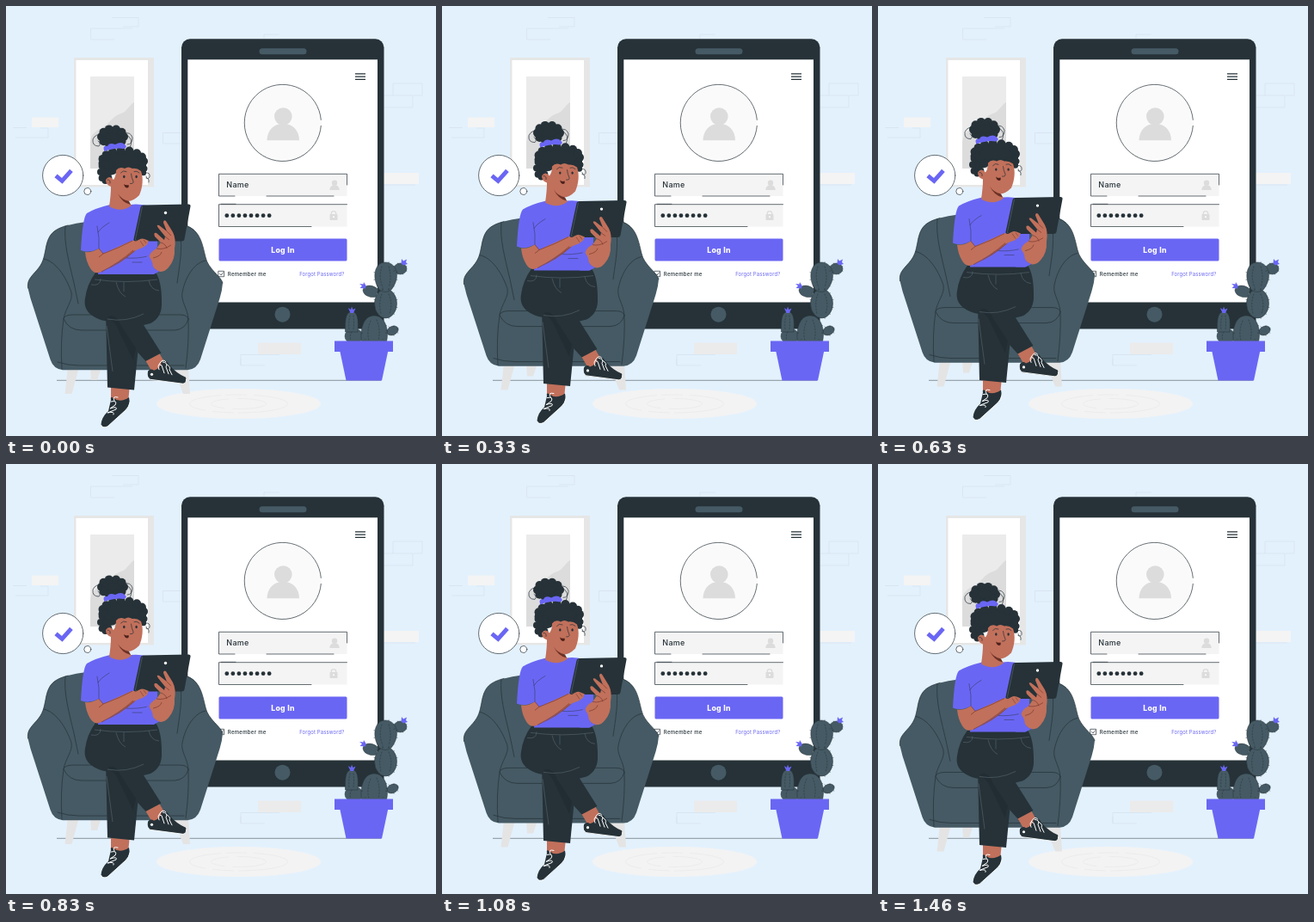
An HTML page for the animation above (1500 ms loop, 500 by 500 pixels).

```html
<!DOCTYPE html>
<html lang="en">
<head>
<meta charset="utf-8">
<title>Log in</title>
<style>
  html, body { margin: 0; width: 100%; height: 100%; overflow: hidden; background: #e3f1fd; }
  svg { display: block; width: 100vw; height: 100vh; }
  text { font-family: Inter, "Open Sans", sans-serif; fill: #263238; }
  .dark { fill: #263238; }
  .slate { fill: #455a64; }
  .accent { fill: #6a66f4; }
  .skin { fill: #c1705b; }
  .grey { fill: #dcdcdc; }
  .pale { fill: #f4f4f4; }
  .line { fill: none; stroke: #263238; stroke-width: .7; stroke-linecap: round; stroke-linejoin: round; }
  .brick { fill: none; stroke: #d6e2ec; stroke-width: .7; }
  .lace { fill: none; stroke: #fff; stroke-width: 1; stroke-linecap: round; }
</style>
</head>
<body>
<svg viewBox="0 0 500 500">
  <rect width="500" height="500" fill="#e3f1fd"/>

  <!-- wall -->
  <g class="brick">
    <path d="M147 26H98.500V39H126M123 13.500H154V24H136M8 141.500H24M11 153H49V142H40M205 147.500H182.500V160H205M300 38V33H318"/>
    <path d="M440 104H450V90H484V104H474M450 104H473V118H440M440 208H476M318 405.500H273V418H301M273 410V418"/>
  </g>
  <rect class="pale" x="30" y="129.500" width="31" height="11.500"/>
  <rect class="pale" x="436" y="194" width="44" height="13"/>
  <rect x="293" y="391.500" width="50" height="13.500" fill="#ebebeb"/>

  <!-- picture -->
  <rect x="79" y="60" width="93" height="150.500" fill="#e6e6e6"/>
  <rect x="81.500" y="63" width="83.500" height="145" fill="#fff"/>
  <rect x="98" y="82" width="51" height="107" fill="#ebebeb"/>
  <path d="M149 112C143 115 142 122 134 125C121 129 119 141 107 144Q99 148 98 158V189H149Z" fill="#dcdcdc"/>

  <!-- rug and floor -->
  <ellipse cx="270.500" cy="462.500" rx="95.500" ry="17.500" fill="#f3f3f3"/>
  <g fill="none" stroke="#e9e9e9" stroke-width=".7">
    <ellipse cx="270.500" cy="462.500" rx="57" ry="10.500" stroke-dasharray="60 5 25 8"/>
    <ellipse cx="270.500" cy="462.500" rx="32" ry="6" stroke-dasharray="40 9"/>
  </g>
  <path d="M59 435.300H436" stroke="#87939a" stroke-width="1"/>

  <!-- device -->
  <rect class="dark" x="204" y="38.300" width="235.500" height="337.300" rx="10"/>
  <rect x="211.300" y="62.300" width="220.700" height="282.200" fill="#fff"/>
  <rect class="slate" x="294.500" y="49.200" width="55" height="7" rx="3.500"/>
  <circle class="slate" cx="321.500" cy="358.700" r="9"/>
  <path d="M406 78.800H418M406 82.100H418M406 85.400H418" stroke="#263238" stroke-width="1.200"/>

  <circle cx="322" cy="137.400" r="44.600" fill="#fafafa"/>
  <path class="line" d="M366.300 132.400A44.600 44.600 0 1 0 366.300 139.400" stroke-width=".6"/>
  <circle class="grey" cx="322.300" cy="128.500" r="10.300"/>
  <path class="grey" d="M303.500 156.200C303.500 145 311 136.700 322.300 136.700S341 145 341 156.200Z"/>

  <g class="pale">
    <rect x="247.500" y="195" width="149" height="26"/>
    <rect x="247.500" y="230.500" width="149" height="26"/>
  </g>
  <path class="line" d="M266 221H247.500V195.300H396.500V208M303 221H381"/>
  <path class="line" d="M355 256.500H247.500V230.700H396.500M250 230.300H267"/>
  <text x="256.300" y="211" font-size="9" font-weight="500" letter-spacing=".3">Name</text>
  <g class="grey">
    <circle cx="382" cy="205.700" r="3.200"/>
    <path d="M376.300 214Q376.500 209.500 380 208.500H384Q387.500 209.500 387.700 214Z"/>
    <rect x="376.500" y="242" width="9" height="7" rx=".8"/>
  </g>
  <path d="M378.300 242.500V241Q378.300 238.700 381 238.700T383.700 241V242.500" fill="none" stroke="#dcdcdc" stroke-width="1.300"/>
  <circle cx="381" cy="245.200" r="1" fill="#fff"/>
  <g id="dots" class="dark"></g>
  <rect class="accent" x="247.500" y="270.500" width="149" height="26" rx="1.500"/>
  <text x="322" y="286.600" font-size="8.700" font-weight="800" letter-spacing=".3" text-anchor="middle" style="fill:#fff">Log In</text>
  <rect class="line" x="247.200" y="308.300" width="6.400" height="6.400" style="fill:#fff"/>
  <path class="line" d="M248.700 311.500L250.100 313L252.400 309.900" stroke-width="1"/>
  <text x="257.800" y="313.600" font-size="6" font-weight="500" letter-spacing=".3">Remember me</text>
  <text x="341.200" y="313.600" font-size="5.900" letter-spacing=".15" style="fill:#6a66f4">Forgot Password?</text>

  <!-- cactus -->
  <g class="slate" stroke="#263238" stroke-width=".5">
    <ellipse cx="404.500" cy="384" rx="10.500" ry="9"/>
    <path d="M394.500 379C394 365 395 355.500 402 355.500S410 364 409 379Z"/>
    <ellipse cx="449.500" cy="377.500" rx="7" ry="5" transform="rotate(-25 449.500 377.500)"/>
    <path d="M414 392C411 380 414 360 428 360S446 379 442 392Z"/>
    <path d="M430 338C425 340 415 337 415 330C417 323 428 324 433 330Z"/>
    <ellipse cx="441.500" cy="346" rx="13" ry="17"/>
    <ellipse cx="458.500" cy="305.500" rx="7.500" ry="6.500"/>
    <path d="M434 330C425 317 428 298 441 298S460 315 448 330Q441 335 434 330Z"/>
  </g>
  <path class="line" d="M424 366Q419 378 422 389M431 365Q436 377 433 389M437 335Q433 345 436 358M445 335Q450 346 446 358M437 303Q433 315 438 327M445 303Q449 315 445 327M400 360Q398 368 399 376M404 360Q405 368 404 376M402 379Q399 384 401 389" stroke-dasharray="1.500 2" stroke-opacity=".7"/>
  <g id="spines" class="line" stroke-opacity=".7"></g>
  <g class="accent">
    <path d="M400.500 357L397.800 351L401 353L402 349.500L403.500 353L406.500 351.500L404 357Z"/>
    <path d="M418 328.500L411.500 328L414 325.500L411 323L415.500 323.500L416 321L418.500 325Z"/>
    <path d="M459.500 299.500L460 294L462 296.500L466 294.500L465 298L467 300L462 301.500Z"/>
    <path d="M388 400H444.500L437 435.500H395.500Z"/>
    <rect x="382" y="389.500" width="68" height="12.500"/>
  </g>

  <!-- floating figure -->
  <g id="floater">
    <g fill="#e4e4e4">
      <path d="M72 420H85L76.500 451H68.500ZM98 420H111L106 435H99ZM194 420H212L214 451H206Z"/>
    </g>
    <path class="slate" d="M25.500 328C24.500 319 28 316 36 307C43 299 44 293 46 283C49 267 53 260 72 255Q92 250 110 250H180Q203 251 214 257C226 264 228 276 232 292C235 306 250 314 252 322Q251.500 330 248.500 340L226 411Q222 422.500 211 423.200H66Q55 422 51.500 411L28.500 340Z"/>
    <g class="line">
      <path d="M25.500 328C24.500 319 28 316 36 307C43 299 44 293 46 283C49 267 53 260 72 255M204 254C226 258 228 276 232 292C235 306 250 314 252 322"/>
      <path d="M44 294C58 297 70 315 76 333C78 343 69 351 67 364Q63 390 65 422M232 296C220 298 209 313 205 333C203 343 211 351 212 364Q213 390 209 421"/>
      <path d="M69 256C67 275 73 297 79 322L84 346M199 253C207 272 203 294 199 322"/>
      <path d="M67 363Q69 359 78 359H202Q211 359 212 364M67 364Q73 377 88 377H196Q209 376 212 364M60 414Q72 418 85 418H207"/>
    </g>

    <!-- straight leg -->
    <path class="skin" d="M122 440H144L142 461Q132 467 122 460Z"/>
    <g transform="translate(0 1)">
      <path class="dark" d="M122 457Q121 452 125 455Q133 461 143 454Q145 462 140 468L118 488Q112 490 110.500 486Q111 477 119 470Z"/>
      <path d="M144 460Q143 465 139 469L118 488Q112 490.500 110.500 486" fill="none" stroke="#fff" stroke-width=".9"/>
      <path class="lace" d="M122 459Q130 457 127 463L121 467Q130 464 128 468L118 472Q127 470 125 474M126 458Q123 452 130 454"/>
    </g>
    <path class="dark" d="M116 355H158L149 446.500L118 443.500Z"/>

    <!-- crossed leg -->
    <path class="skin" d="M158 405L175 398L187 419Q184 429 172 429Z"/>
    <g transform="translate(0 .8)">
      <path class="dark" d="M165 424Q168 420 172 423Q180 421 181 412Q187 410 190 417Q199 427 209 431Q211 437 206 438.500L167 433.500Q164 430 165 424Z"/>
      <path d="M165.500 431Q166 433.500 168 433.500L206 438.500Q210 437.500 209.500 433" fill="none" stroke="#fff" stroke-width=".9"/>
      <path class="lace" d="M178 422Q175 414 181 417L184 426M182 413Q189 414 186 419L189 427M187 416Q192 419 190 422L193 428M178 416Q182 408 186 413"/>
      <circle cx="169.500" cy="427.500" r="1.600" fill="#fff"/>
    </g>
    <path class="dark" d="M104 310H174Q181 320 181 344Q182 362 168 369L160 371L180.500 403.500L162.500 413L121 367C103 365 89 356 92 340Q94 324 104 310Z"/>
    <path d="M118 362Q127 356 134 372L151 398L148 412L128 371Q122 364 118 362Z" fill="#222d33"/>
    <g fill="none" stroke="#627078" stroke-width=".5">
      <path d="M103 318Q140 323 176 318M99 324Q110 326 110 317M166 319Q168 330 178 331M128 321Q131 334 139 338M137 321V332M118 364Q140 368 160 358M117 372L124 425"/>
    </g>

    <!-- torso -->
    <path class="accent" d="M121 231Q104 235 94 241Q89 246 87 284Q96 288 108 282Q109 297 107 312H171V296L176 280V237Q160 229 145 231Z"/>
    <path class="line" d="M106 256Q109 270 108 282M108 293Q110 303 108 310M140 293Q151 294 165 291M120 252Q110 258 107 263M147 298H158" stroke-opacity=".65"/>

    <!-- far arm -->
    <path class="skin" d="M92 286Q100 287 108 282L113 288Q130 280 146 273L164 271Q168 277 158 281L151 284Q130 299 111 309Q103 313 98 305Q93 297 92 286Z"/>
    <path d="M108 282L113 288Q132 281 147 273M113 288L108 292M111 309Q131 299 148 284" fill="none" stroke="#7d3c2d" stroke-width=".7"/>
    <path d="M111 309Q128 302 148 285L151 284Q132 301 113 308Z" fill="#8f4938"/>

    <!-- hair -->
    <g id="hair" class="dark"></g>
    <path class="accent" d="M114 168Q112 162 118 163Q120 158 127 161Q134 157 138 161Q142 164 137 166Q128 164 114 169Z"/>
    <path class="line" d="M112 150Q104 148 101 155Q100 163 108 163Q111 160 107 157M137 148Q145 146 147 153Q147 161 141 161M140 150Q149 154 144 165M162 194Q168 193 167 199Q164 203 163 198M163 200Q167 200 166 205M117 144Q113 138 120 140"/>

    <!-- face -->
    <path class="skin" d="M128 191Q132 186 138 189Q142 186 147 189Q152 188 157 192C160 200 159 211 155 220Q148 227 142 227L146 232Q134 241 120 233Q122 220 122 210Q116 208 116 202Q120 196 125 202Q128 198 128 191Z"/>
    <path d="M130 218Q134 225 143 227L145 231Q135 229 130 218Z" fill="#6d3125"/>
    <path class="line" d="M133.500 194Q136 190.500 140 192.500M149 192.500Q152 191 155 194M145.500 195Q146 200 148 204Q148.500 207 144.500 206.500M118 202Q122 202 121 206"/>
    <ellipse class="dark" cx="137.300" cy="198.500" rx="1.200" ry="1.700"/>
    <ellipse class="dark" cx="151.600" cy="198.500" rx="1.200" ry="1.700"/>
    <path d="M137 207Q139 209 142.500 208Q143.500 211.500 140.500 211.500Q138 211 137 207Z" fill="#4c211a"/>

    <!-- held tablet -->
    <path class="dark" d="M160 231.500L212 230.500Q215 230.500 214.500 233L207.500 271Q207 273.500 204 273.500H151Q148 273.500 148.500 271L156.500 234Q157 231.500 160 231.500Z"/>
    <path d="M158.500 233L150.500 271Q150 272.500 152 272.500" fill="none" stroke="#52636c" stroke-width=".7"/>
    <circle cx="185.500" cy="240.500" r="1.700" fill="#fff"/>
    <path class="skin" d="M151 274Q157 269 161 271L166 273L159 281L150 283Z"/>
    <path d="M156 273L160 279M160 272L163 276" stroke="#7d3c2d" stroke-width=".6"/>

    <!-- near hand -->
    <path class="skin" d="M185 268L177 258Q174 254 178 255L187 262L183 252Q183 248 186 250L194 263Q198 271 196 282Q197 295 189 304Q183 311 176 308Q168 303 166 293Q167 286 175 282L180 275L173 268Q171 263 175 264L184 272Z"/>
    <path d="M185 268L190 272M187 262L192 267M180 275Q186 277 187 282M175 282Q183 284 192 278M171 293Q180 291 181 286" fill="none" stroke="#7d3c2d" stroke-width=".7"/>
    <path class="accent" d="M164 289Q170 294 171 303Q175 309 179 308L172 312H160Z"/>
  </g>

  <!-- thought bubble -->
  <g class="line" style="fill:#fff">
    <circle cx="66.200" cy="197" r="23.600"/>
    <circle cx="94.800" cy="215.500" r="4"/>
  </g>
  <path d="M58 197.300L65.200 203.300L75.900 191.300" fill="none" stroke="#6a66f4" stroke-width="5"/>
</svg>
<script>
  const NS = "http://www.w3.org/2000/svg";
  const $ = id => document.getElementById(id);

  function add(parent, tag, attrs) {
    const el = document.createElementNS(NS, tag);
    for (const key in attrs) el.setAttribute(key, attrs[key]);
    parent.appendChild(el);
  }
  const dot = (parent, cx, cy, r) => add(parent, "circle", { cx, cy, r });

  for (let i = 0; i < 8; i++) dot($("dots"), 256.800 + i * 7.050, 243.700, 2.400);

  // Curls: a filled core with a ring of small lobes
  function curls(cx, cy, rx, ry, n, r) {
    add($("hair"), "ellipse", { cx, cy, rx, ry });
    for (let i = 0; i < n; i++) {
      const a = i / n * 2 * Math.PI;
      dot($("hair"), cx + rx * Math.cos(a), cy + ry * Math.sin(a), r);
    }
  }
  curls(124, 152, 13, 9, 10, 5);
  curls(136, 180.500, 24, 12.500, 15, 5);
  curls(115.500, 193, 5.500, 10, 8, 4);
  curls(159, 189, 2, 5, 5, 3.500);

  // Short spines around a cactus pad
  function spines(cx, cy, rx, ry, n) {
    let d = "";
    for (let i = 0; i < n; i++) {
      const a = (i + .5) / n * 2 * Math.PI, c = Math.cos(a), s = Math.sin(a);
      d += `M${cx + rx * c} ${cy + ry * s}l${c} ${s}`;
    }
    add($("spines"), "path", { d });
  }
  spines(441.500, 314, 13, 16, 12);
  spines(441.500, 346, 13, 17, 12);
  spines(428, 376, 14, 16, 12);
  spines(458.500, 305.500, 7, 6, 8);
  spines(449.500, 377.500, 6, 5, 7);

  const LOOP = 1500, RISE = 10;
  const floater = $("floater");
  let start;

  function draw(now) {
    if (start === undefined) start = now;
    const p = (now - start) % LOOP / LOOP;
    const y = -RISE * (1 - Math.abs(2 * p - 1));
    floater.setAttribute("transform", `translate(0 ${y.toFixed(3)})`);
    requestAnimationFrame(draw);
  }
  requestAnimationFrame(draw);
</script>
</body>
</html>
```
